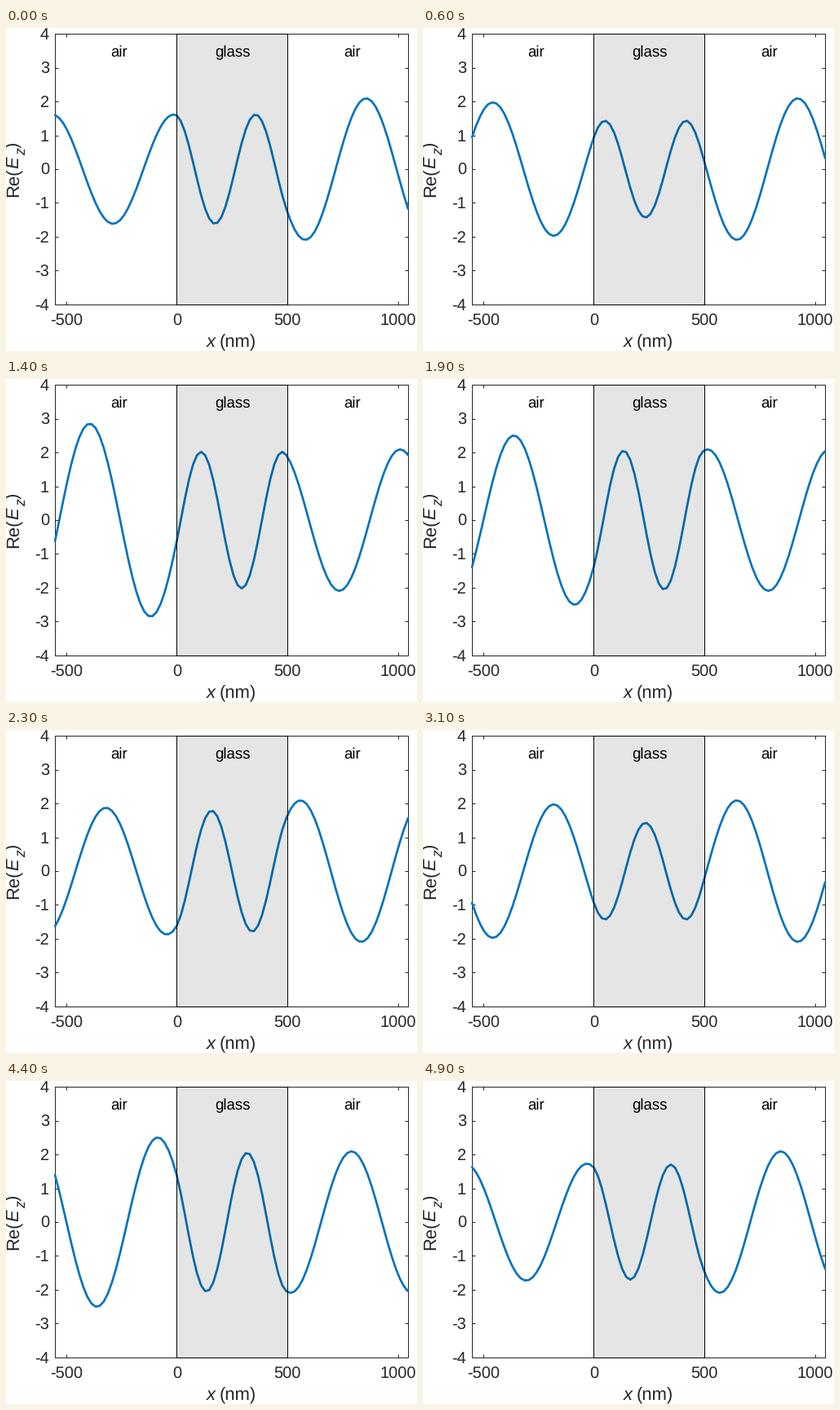
A matplotlib script for the animation above (5000 ms loop, 504x396 px).

```python
import matplotlib.pyplot as plt
import numpy as np
from matplotlib.animation import FuncAnimation
from matplotlib.patches import Rectangle

W, H = 504, 396
FRAMES, INTERVAL = 50, 100
LEFT, RIGHT, TOP, BOTTOM = 60.1, 493.1, 7.2, 338.8
INK = (0.15, 0.15, 0.15)
BLUE = (0, 0.447, 0.741)
TICK_SIZE, LABEL_SIZE, NOTE_SIZE = 20, 22, 18.67

plt.rcParams.update({"font.family": "Liberation Sans", "text.hinting": "none"})
fig = plt.figure(figsize=(W / 72, H / 72), dpi=72, facecolor="white")  # 1 pt = 1 px


def put(x, y, text, size, color=INK, **style):
    """Write text with its baseline at pixel (x, y), counted from the top left."""
    fig.text(x / W, 1 - y / H, text, size=size, color=color, va="baseline", **style)


# Plane wave through a glass slab; lengths in nm, x samples lie at cell edges.
WAVELENGTH, INDEX, THICKNESS = 550, 1.5, 500
INCIDENT = 2.195
x = np.linspace(-550, 1045, 88)
ENTRY = -(x[1] - x[0]) / 2
EXIT = ENTRY + THICKNESS


def slab_field(x):
    k_air = 2 * np.pi / WAVELENGTH
    k_glass = INDEX * k_air
    depth = k_glass * THICKNESS
    incident = np.cos(depth) - 0.5j * (INDEX + 1 / INDEX) * np.sin(depth)
    reflected = 0.5j * (INDEX - 1 / INDEX) * np.sin(depth)
    approach = np.exp(1j * k_air * (x - ENTRY))
    inner = k_glass * (x - EXIT)
    before = incident * approach + reflected / approach
    inside = np.cos(inner) + 1j / INDEX * np.sin(inner)
    after = np.exp(1j * k_air * (x - EXIT))
    shape = np.where(x < ENTRY, before, np.where(x < EXIT, inside, after))
    return INCIDENT * shape / incident


field = slab_field(x)

ax = fig.add_axes([LEFT / W, 1 - BOTTOM / H, (RIGHT - LEFT) / W, (BOTTOM - TOP) / H])
ax.set(xlim=(x[0], x[-1]), ylim=(-4, 4),
       xticks=range(-500, 1001, 500), yticks=range(-4, 5))
ax.set_axisbelow(True)
ax.tick_params(direction="in", length=4.3, width=1, color=INK, top=True, right=True,
               labelleft=False, labelbottom=False)
for spine in ax.spines.values():
    spine.set(linewidth=1, edgecolor=INK, zorder=1)

wave, = ax.plot([], [], color=BLUE, lw=2.67, zorder=3, clip_on=False,
                solid_capstyle="round", solid_joinstyle="round")
ax.add_patch(Rectangle((0, -4), 500, 8, facecolor=(0, 0, 0, 0.1), edgecolor="black",
                       lw=1, zorder=4, clip_on=False))

for value in range(-500, 1001, 500):
    px = LEFT + (value - x[0]) / (x[-1] - x[0]) * (RIGHT - LEFT)
    put(px, 365, str(value), TICK_SIZE, ha="center")
for value in range(-4, 5):
    py = TOP + (4 - value) / 8 * (BOTTOM - TOP)
    put(53, py + 7, str(value), TICK_SIZE, ha="right")
for px, name in ((138.5, "air"), (278.3, "glass"), (424.5, "air")):
    put(px, 35, name, NOTE_SIZE, "black", ha="center")

put(245.5, 391, "x", LABEL_SIZE, style="italic")
put(262, 391, "(nm)", LABEL_SIZE)
upright = dict(rotation=90, rotation_mode="anchor", ha="left")
put(15.5, 206.5, "Re(", LABEL_SIZE, **upright)
put(15.5, 171.5, "E", LABEL_SIZE, style="italic", **upright)
put(24.5, 156.5, "z", 0.8 * LABEL_SIZE, style="italic", **upright)
put(15.5, 147, ")", LABEL_SIZE, **upright)


def draw(frame):
    phase = -2 * np.pi * (frame + 1) / FRAMES
    wave.set_data(x, (field * np.exp(1j * phase)).real)
    return wave,


anim = FuncAnimation(fig, draw, frames=FRAMES, interval=INTERVAL, repeat=True,
                     repeat_delay=0)
plt.show()
```
